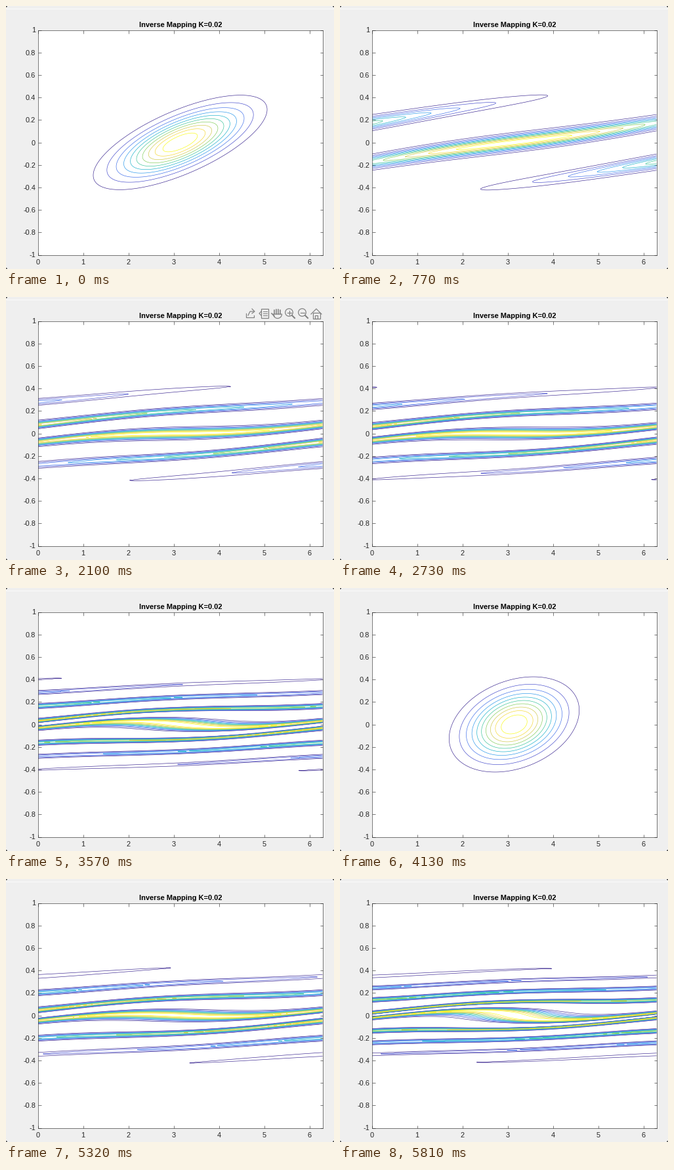
A matplotlib script that plays this animation: 500 by 400 pixels, repeating every 6.3 s.

```python
import math

import numpy as np
import matplotlib.pyplot as plt
from matplotlib.animation import FuncAnimation
from matplotlib.colors import LinearSegmentedColormap
from matplotlib.patches import Circle, Rectangle, Wedge

W, H, DPI = 500, 400, 100
SLOTS, SLOT_MS = 90, 70
PX = 72 / DPI
LEFT, RIGHT, TOP, BOTTOM = 48.5, 482.5, 36.5, 378.5
TURN = 2 * math.pi
INK, ICON = "#262626", "#808080"

# Pendulum-like flow: dx/dt = p, dp/dt = KICK * sin(x)
KICK = 0.002
LEVELS = np.arange(1, 11) / 11
REACH = math.sqrt(2 * math.log(11))
SIGMA_X, SIGMA_P = 1.37 / REACH, 0.424 / REACH
PARULA = LinearSegmentedColormap.from_list("parula", [
    "#3a2690", "#475bea", "#2796eb", "#12beb9", "#81cc59", "#f3c640",
    "#f9fb15"])

# Timing, in slots
START, RESTART, END = 2, 58.6, 83
TOOLBAR_ON, TOOLBAR_OFF = 18, 35
STALLS = {16, 17, 22, 23, 27, 28, 32, 33, 34, 41}

plt.rcParams["font.family"] = "Liberation Sans"
fig = plt.figure(figsize=(W / DPI, H / DPI), dpi=DPI, facecolor="#efefef")

# Plot area
ax = fig.add_axes([LEFT / W, 1 - BOTTOM / H,
                   (RIGHT - LEFT) / W, (BOTTOM - TOP) / H])
ax.set(xlim=(0, TURN), ylim=(-1, 1),
       xticks=range(7), yticks=np.linspace(-1, 1, 11))
ax.tick_params(direction="in", top=True, right=True, length=4.5 * PX,
               width=0.6 * PX, color=INK, labelbottom=False, labelleft=False)
for spine in ax.spines.values():
    spine.set(linewidth=0.6 * PX, edgecolor=INK)

# Window chrome and labels, in pixels from the top left
ui = fig.add_axes([0, 0, 1, 1], zorder=3)
ui.set(xlim=(0, W), ylim=(H, 0))
ui.axis("off")


def label(x, y, text, ha="center", **style):
    ui.text(x, y, text, ha=ha, va="baseline", fontsize=11 * PX, **style)


label(266, 32.5, "Inverse Mapping K=0.02", weight="bold", color="black")
for i in range(7):
    label(LEFT + i * (RIGHT - LEFT) / TURN, 393, str(i), color=INK)
for i in range(11):
    y = BOTTOM - i * (BOTTOM - TOP) / 10
    label(45, y + 4, f"{(i - 5) / 5:g}", ha="right", color=INK)

ui.plot([0, W], [3.5, 3.5], color="#fafafa", lw=PX)
for x in (0, W):
    for y in (0, H):
        ui.add_patch(Circle((x, y), 2, color="#505050", lw=0))

toolbar = []


def stroke(*points, width=1.2):
    xs, ys = zip(*points)
    toolbar.extend(ui.plot(xs, ys, color=ICON, lw=width * PX))


def outline(patch):
    patch.set(facecolor="none", edgecolor=ICON, linewidth=1.2 * PX)
    toolbar.append(ui.add_patch(patch))


def export_icon(x, y):
    stroke((x - 7, y), (x - 7, y + 6), (x + 5, y + 6), (x + 5, y + 3))
    stroke((x - 4, y + 3), (x - 1, y - 3), (x + 5, y - 3))
    stroke((x + 2, y - 7), (x + 6, y - 3), (x + 2, y))


def note_icon(x, y):
    outline(Rectangle((x - 4, y - 7), 11, 14))
    stroke((x - 4, y - 3), (x - 7, y), (x - 4, y + 3))
    for dy in (-3, 0, 3):
        stroke((x - 1, y + dy), (x + 5, y + dy), width=1)


def hand_icon(x, y):
    outline(Wedge((x + 1, y + 1), 6.5, 0, 180))
    for i in range(4):
        dx = 3 * i - 4
        stroke((x + dx, y + 1), (x + dx, y - 7 + abs(i - 1.5)), width=1.6)
    stroke((x - 4, y + 4), (x - 8, y), width=1.6)


def zoom_icon(x, y, plus):
    outline(Circle((x - 1.5, y - 1.5), 5.8))
    stroke((x + 3, y + 3), (x + 7, y + 7), width=2)
    stroke((x - 4.5, y - 1.5), (x + 1.5, y - 1.5))
    if plus:
        stroke((x - 1.5, y - 4.5), (x - 1.5, y + 1.5))


def home_icon(x, y):
    stroke((x - 8, y + 1), (x, y - 7), (x + 8, y + 1))
    outline(Rectangle((x - 5.5, y - 1), 11, 9))
    outline(Rectangle((x - 2, y + 3), 4, 5))


export_icon(373, 25)
note_icon(393, 25)
hand_icon(413, 25)
zoom_icon(433, 25, plus=True)
zoom_icon(453, 25, plus=False)
home_icon(473, 25)


def flow_time(slot):
    """Elapsed time: a stalling first run, then a faster run from zero."""
    if slot > RESTART - 2:
        return max(0, 2.55 * (min(slot, END) - RESTART))
    t = 3.2
    for s in range(START + 1, slot + 1):
        if s not in STALLS:
            t += 0.86 if 22 <= s < 40 else 1.47
    return t


p_axis = np.linspace(-1, 1, 320)
grid_x, grid_p = np.meshgrid(np.linspace(0, TURN, 300),
                             p_axis[np.abs(p_axis) < 0.5])


def density(t):
    """Trace every grid point back to the initial Gaussian."""
    x, p = grid_x.copy(), grid_p.copy()
    n = max(1, math.ceil(t / 1.5))
    dt = t / n
    for _ in range(n):
        x -= p * dt / 2
        p -= KICK * np.sin(x) * dt
        x -= p * dt / 2
    u = x % TURN - math.pi
    return np.exp(-0.5 * ((u / SIGMA_X) ** 2 + (p / SIGMA_P) ** 2))


lines = None


def draw(slot):
    global lines
    if lines is not None:
        lines.remove()
    lines = ax.contour(grid_x, grid_p, density(flow_time(slot)), LEVELS,
                       cmap=PARULA, linewidths=0.65 * PX)
    for part in toolbar:
        part.set_visible(TOOLBAR_ON <= slot < TOOLBAR_OFF)
    return []


anim = FuncAnimation(fig, draw, frames=SLOTS, interval=SLOT_MS,
                     init_func=lambda: [], repeat=True, repeat_delay=0)
plt.show()
```
